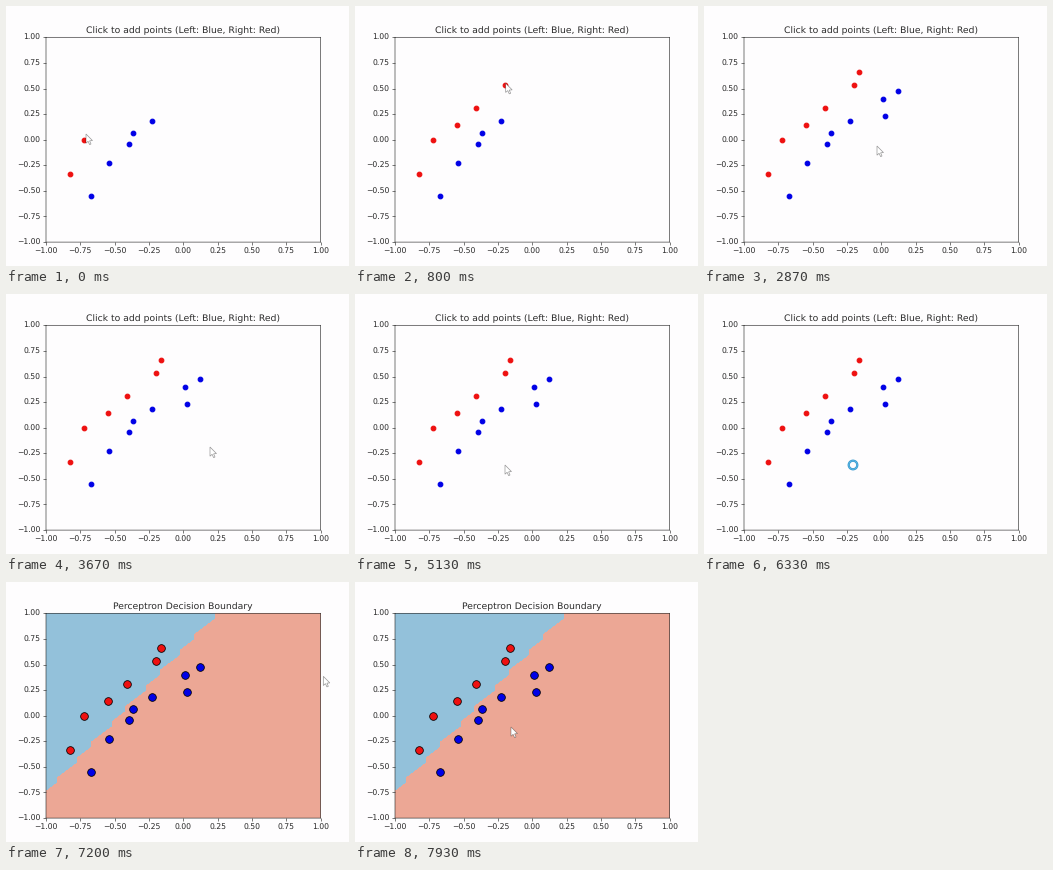
These frames come from a looping animation (343 by 260 pixels, 8000 ms). A matplotlib script:

```python
import numpy as np
import matplotlib.pyplot as plt
from matplotlib.animation import FuncAnimation
from matplotlib.patches import Circle, Polygon

W, H, DPI = 343, 260, 64
LEFT, RIGHT, TOP, BOTTOM = 40, 314.5, 31.3, 236.1
LOOP, STEP = 8000, 40
SCALE = 0.865  # shrinks default point sizes to the stage
BUSY, RESULT, SWEEP_START, SWEEP_END = 6310, 6400, 6430, 7920
PAPER, INK = "#fefdfe", "#2b2b2b"

plt.rcParams.update({
    "font.family": "DejaVu Sans",
    "font.size": 10 * SCALE,
    "text.hinting": "none",
    "axes.titlesize": 12 * SCALE,
    "axes.titlepad": 6 * SCALE,
    "axes.linewidth": 0.8 * SCALE,
    "axes.edgecolor": INK,
    "axes.facecolor": PAPER,
    "text.color": INK,
})
for axis in ("xtick", "ytick"):
    plt.rcParams.update({
        f"{axis}.color": INK,
        f"{axis}.major.size": 3.5 * SCALE,
        f"{axis}.major.pad": 3.5 * SCALE,
        f"{axis}.major.width": 0.8 * SCALE,
    })

RED = np.array([(-0.825, -0.335), (-0.725, 0), (-0.545, 0.147),
                (-0.41, 0.31), (-0.2, 0.53), (-0.16, 0.665)])
BLUE = np.array([(-0.675, -0.55), (-0.54, -0.225), (-0.395, -0.04),
                 (-0.365, 0.063), (-0.225, 0.18), (0.025, 0.23),
                 (0.01, 0.4), (0.125, 0.48)])


def click_times(points, already, first, gap):
    """Points after the first few are clicked at a steady pace."""
    order = np.arange(len(points)) - already
    return np.where(order < 0, 0, first + gap * order)


def to_pixels(point):
    x, y = (np.asarray(point) + 1) / 2
    return np.array([LEFT + x * (RIGHT - LEFT), BOTTOM - y * (BOTTOM - TOP)])


def build_legs():
    """Pointer moves as (start, end, destination in pixels)."""
    legs, start = [], 0
    for points, times in ((RED, RED_TIMES), (BLUE, BLUE_TIMES)):
        for point, time in zip(points, times):
            if time:
                legs.append((start, time, to_pixels(point)))
                start = time
    return legs + [
        (start, 2700, np.array([173, 140])),
        (2850, 3200, np.array([204, 153])),
        (3650, 4070, np.array([150, 171])),
    ]


RED_TIMES = click_times(RED, 2, 260, 240)
BLUE_TIMES = click_times(BLUE, 5, 1380, 390)
LEGS = build_legs()


def progress(t, start, end):
    return np.clip((t - start) / (end - start), 0, 1)


def pointer_tip(t):
    tip = np.array([80.0, 128.0])
    for start, end, goal in LEGS:
        u = progress(t, start, end)
        tip = tip + (goal - tip) * u * u * (3 - 2 * u)
    # wide loop to the right over the finished plot
    u = progress(t, SWEEP_START, SWEEP_END) ** 1.4
    return tip + np.array([6, -26]) * u + np.array([174, -70]) * np.sin(np.pi * u)


fig = plt.figure(figsize=(W / DPI, H / DPI), dpi=DPI, facecolor=PAPER)
ax = fig.add_axes([LEFT / W, 1 - BOTTOM / H, (RIGHT - LEFT) / W, (BOTTOM - TOP) / H])
ax.set(xlim=(-1, 1), ylim=(-1, 1))
title = ax.set_title("")
for spine in ax.spines.values():
    spine.set_snap(False)

# Predicted classes on a grid give the slightly stepped border
gx, gy = np.meshgrid(*[np.linspace(-1, 1, 41)] * 2)
classes = np.where(gy > 1.4 * gx + 0.66, 1, -1)
regions = ax.contourf(gx, gy, classes, levels=[-2, 0, 2],
                      colors=["#eca795", "#93c1da"])


def dots(points, color, size, **style):
    return ax.scatter(*points.T, c=color, s=(size * SCALE) ** 2, zorder=3,
                      snap=False, **style)


groups = [(RED, RED_TIMES, "#ee1010"), (BLUE, BLUE_TIMES, "#0000e6")]
clicked = [dots(p, c, 6, linewidths=1.5 * SCALE) for p, _, c in groups]
final = [dots(p, c, 10, linewidths=SCALE, edgecolors="black")
         for p, _, c in groups]

stage = fig.add_axes([0, 0, 1, 1])
stage.set(xlim=(0, W), ylim=(H, 0))
stage.axis("off")
ARROW = np.array([(0, 0), (0, 9.2), (2.1, 7.3), (3.6, 10.6),
                  (5, 10), (3.6, 6.8), (6.5, 6.6)])
pointer = stage.add_patch(Polygon(ARROW, fc="white", ec=(0, 0, 0, 0.4), lw=0.8))
ring = [stage.add_patch(Circle((149, 171), 4.3, fill=False, ec=color, lw=width))
        for color, width in (("#3598cf", 2.5), ("#62bde6", 0.8))]


def update(frame):
    t = frame * STEP
    done = t >= RESULT
    busy = BUSY <= t < RESULT
    title.set_text("Perceptron Decision Boundary" if done
                   else "Click to add points (Left: Blue, Right: Red)")
    regions.set_visible(done)
    for (points, times, _), small, large in zip(groups, clicked, final):
        small.set_offsets(points[times <= t])
        small.set_visible(not done)
        large.set_visible(done)
    pointer.set_visible(not busy)
    pointer.set_xy(ARROW + pointer_tip(t))
    for circle in ring:
        circle.set_visible(busy)
    return []


anim = FuncAnimation(fig, update, frames=LOOP // STEP, interval=STEP,
                     repeat=True, repeat_delay=0, blit=False)
plt.show()
```
